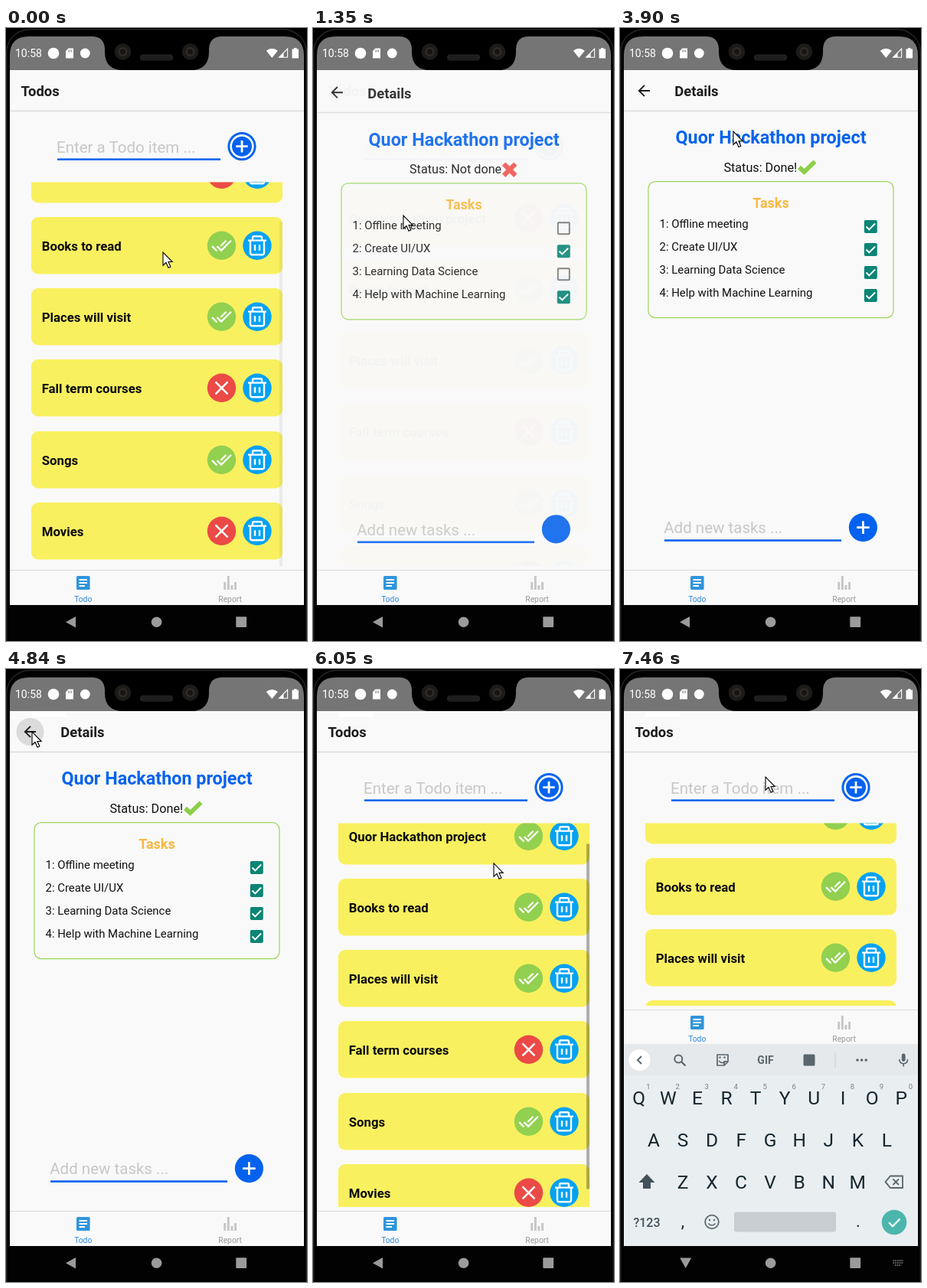
Recreate the animation shown at these times as an HTML page. Size 393 by 801 pixels, loop 8000 ms.

```html
<!DOCTYPE html>
<html lang="en">
<head>
<meta charset="utf-8">
<title>Todos</title>
<style>
html, body { margin: 0; width: 100%; height: 100%; overflow: hidden; background: #000; }
svg { display: block; width: 393px; height: 801px; font-family: Roboto, "Noto Sans", sans-serif; }
</style>
</head>
<body>
<svg id="stage" viewBox="0 0 393 801"></svg>
<script>
const LOOP = 8000, STEP = 135, EARLY = 15;
const PITCH = 93.33, KEYBOARD = 263, DRAG = 57, RISE = 52;
const BLUE = '#0462ee', BG = '#f9f9f9';
const PROJECT = 'Quor Hackathon project';
const MEMOS = [PROJECT, 'Books to read', 'Places will visit', 'Fall term courses', 'Songs', 'Movies'];
const DONE = [false, true, true, false, true, false];
const TASKS = ['Offline meeting', 'Create UI/UX', 'Learning Data Science', 'Help with Machine Learning'];

// Moments that the motion hangs on, in ms.
const T = { top: 140, press: 790, open: 1196, check: 2350, finish: 3600, back: 4840, drag: 5900, dragEnd: 6168, type: 6950 };

// The picture is refreshed in bursts of even steps and rests in between.
const BURSTS = [[0, T.top], [430, 790], [1220, 1500], [1810, 2800], [2950, 3220],
  [3600, 4560], [4840, 5770], [5900, 6890], [7040, 7460]];
const TICKS = BURSTS.flatMap(([from, to]) => {
  const n = Math.round((to - from) / STEP);
  return Array.from({ length: n + 1 }, (_, i) => from + (to - from) * i / n);
});

// Pointer moves: start, end, x, y.
const MOVES = [[0, 140, 205, 330], [430, 790, 118, 245], [1360, 1500, 368, 384], [1810, 2090, 330, 262],
  [2520, 2800, 340, 384], [2950, 3220, 331, 321], [3600, 4006, 60, 46], [4150, 4560, 34, 82],
  [4840, 5100, 83, 115], [5100, 5510, 236, 284], [T.drag, T.dragEnd, 236, 284 - DRAG], [6330, 6890, 190, 141]];

const ramp = (t, from, to) => Math.min(1, Math.max(0, (t - from) / (to - from)));
const during = (t, from, length = STEP) => t >= from && t < from + length;

function pointer(t) {
  let x = 205, y = 293;
  for (const [from, to, nx, ny] of MOVES) {
    const p = ramp(t, from, to);
    x += (nx - x) * p;
    y += (ny - y) * p;
  }
  return [x, y];
}

const scrollAt = t => t < T.top ? DRAG : Math.round(DRAG * ramp(t, T.drag, T.dragEnd));

function barAlpha(t) {
  if (t < T.top) return .06;
  return t < T.drag ? .3 * (1 - ramp(t, 430, 790)) : .3 * (1 - ramp(t, 6330, 6890));
}

// Quick rise that slows down on opening, linear fall on closing.
const detailsAt = t => t < T.back ? 1 - (1 - ramp(t, T.open, T.open + 350)) ** 5 : 1 - ramp(t, T.back, T.back + 260);

const rect = (x, y, w, h, fill, r = 0, extra = '') =>
  `<rect x="${x}" y="${y}" width="${w}" height="${h}" rx="${r}" fill="${fill}" ${extra}/>`;
const circle = (x, y, r, fill, extra = '') => `<circle cx="${x}" cy="${y}" r="${r}" fill="${fill}" ${extra}/>`;
const path = (d, fill, extra = '') => `<path d="${d}" fill="${fill}" ${extra}/>`;
const line = (d, color, w, extra = '') => path(d, 'none', `stroke="${color}" stroke-width="${w}" ${extra}`);
const text = (s, x, y, size, fill, weight = 400, anchor = 'start') =>
  `<text x="${x}" y="${y}" font-size="${size}" fill="${fill}" font-weight="${weight}" text-anchor="${anchor}">${s}</text>`;
const label = (s, x, y, size, fill, weight) => text(s, x, y, size, fill, weight, 'middle');
const at = (x, y, body) => `<g transform="translate(${x} ${y})">${body}</g>`;
const group = (id, body = '') => `<g id="${id}">${body}</g>`;
const clip = (id, body) => `<g clip-path="url(#${id})">${body}</g>`;
const plus = (r, w) => line(`M${-r} 0H${r}M0 ${-r}V${r}`, '#fff', w);
const cross = (r, color, w) => line(`M${-r} ${-r}L${r} ${r}M${r} ${-r}L${-r} ${r}`, color, w);

const doneIcon = circle(0, 0, 18.7, '#92d050') +
  path('M18 7l-1.41-1.41-6.34 6.34 1.41 1.41L18 7zm4.24-1.41L11.66 16.17 7.48 12l-1.41 1.41L11.66 19l12-12-1.42-1.41zM.41 13.41L6 19l1.41-1.41L1.83 12 .41 13.41z',
    '#fff', 'transform="scale(1.14) translate(-12 -12)"');
const openIcon = circle(0, 0, 18.7, '#eb4a46') + cross(8, '#fff', 2.5);
const binIcon = circle(0, 0, 18.7, '#03a2f2') +
  line('M-12-6.7H12M-6-7V-10.5Q-6-12-4.5-12H4.5Q6-12 6-10.5V-7M-9-6V9.5Q-9 12-6.5 12H6.5Q9 12 9 9.5V-6M-3-1V6.5M3-1V6.5',
    '#fff', 2.4, 'stroke-linejoin="round"');

const header = (title, x) => rect(5, 55, 384, 53, BG) + rect(5, 107.6, 384, 1.4, '#dcdcdc') +
  rect(5, 109, 384, 1, '#f1f1f1') + text(title, x, 89.3, 18.4, '#1c1c1e', 700);

function card(name, i) {
  return at(0, Math.round(210.5 + i * PITCH), rect(33, 0, 328, 74.5, '#f9f05f', 9) +
    group('name' + i, text(name, 46.7, 43.6, 16.8, '#0a0a0a', 700)) +
    at(281.5, 37.3, group('mark' + i, DONE[i] ? doneIcon : openIcon)) + at(328, 37.3, binIcon));
}

function listScreen() {
  return rect(5, 55, 384, 655, BG) + header('Todos', 19.6) +
    text('Enter a Todo item ...', 66, 162.6, 20.53, '#c7c7c9') + rect(67, 170.4, 213, 2.5, BLUE) +
    at(308, 154.7, circle(0, 0, 18.6, BLUE) + circle(0, 0, 14.3, BLUE, 'stroke="#fff" stroke-width="2.6"') + plus(7.7, 2.8)) +
    clip('view', group('cards', MEMOS.map(card).join('')) + rect(357, 0, 4, 451, '#000', 0, 'id="bar"'));
}

function checkbox(i) {
  return at(327.3, 259.5 + i * 30,
    circle(0, 0, 18, '#0b8574', `id="ripple${i}" opacity="0"`) +
    group('off' + i, rect(-7.5, -7.5, 15, 15, 'none', 1, 'stroke="#757575" stroke-width="1.9"')) +
    group('on' + i, rect(-8.5, -8.5, 17, 17, '#0b8574', 2) + line('M-5.8 0L-2 3.8L5.8-4', '#fff', 1.9)));
}

function detailScreen() {
  const status = group('open', text('Status: Not done', 126, 188, 16.2, '#111') + at(256.7, 183, cross(7.6, '#ef5350', 6.2))) +
    group('done', text('Status: Done!', 135.4, 188, 16.2, '#111') + line('M234 182L240.5 188L254.5 174.5', '#8bcf46', 5.8));
  const row = (s, i) => text(`${i + 1}: ${s}`, 51.5, 261 + i * 30, 14.93, '#111') + checkbox(i);
  return rect(5, 55, 384, 655, BG) + header('Details', 71.3) +
    circle(31.5, 82, 18, '#000', 'id="backRipple" opacity="0"') +
    line('M39 82H25M32 74.8L24.8 82L32 89.2', '#1c1c1e', 1.9) +
    label(PROJECT, 197, 151.4, 23.33, BLUE, 700) + status +
    rect(37, 200.6, 320, 178, 'none', 9, 'stroke="#9bd65a" stroke-width="1.2"') +
    label('Tasks', 197, 234.5, 18, '#f9b840', 700) + TASKS.map(row).join('') +
    text('Add new tasks ...', 57.2, 660.3, 20.53, '#c7c7c9') + rect(58, 668.3, 231, 2.6, BLUE) +
    at(317.4, 652.6, circle(0, 0, 18.6, BLUE) + group('plus', plus(8.3, 2.7)));
}

function tabs() {
  const bar = i => rect(284.3 + i * 4.6, 724 - (i === 1) * 8 + (i === 2) * 4, 2.9, 10 + (i === 1) * 8 - (i === 2) * 4, '#c6c6c6');
  return rect(5, 703, 384, 51, BG) + rect(5, 708, 384, 1, '#dadada') +
    rect(92, 716, 17.6, 18, '#2f95dc', 1.5) + line('M95.5 721H106M95.5 725H106M95.5 729H103', '#fff', 1.9) +
    label('Todo', 100.7, 750, 10.27, '#2e86e0') +
    [0, 1, 2, 3].map(bar).join('') + label('Report', 292.6, 750, 10.27, '#98989c');
}

function keyboard() {
  const ink = '#5a666d', dark = '#14262e', step = 38.05;
  const keys = (s, x, y, size, fill) => [...s].map((k, i) => label(k, x + i * step, y, size, fill)).join('');
  const face = (x, y) => circle(x - 3, y - 2.5, 1.2, ink) + circle(x + 3, y - 2.5, 1.2, ink) +
    line(`M${x - 4.5} ${y + 2}Q${x} ${y + 7} ${x + 4.5} ${y + 2}`, ink, 1.7);
  const toolbar = rect(5, 490, 384, 41, '#e5e9ec') + circle(25.5, 511, 14, '#fff') + line('M28 506L23 511L28 516', ink, 2) +
    circle(76.3, 509.5, 5, 'none', `stroke="${ink}" stroke-width="2"`) + line('M80 513L85.5 518.5', ink, 2.3) +
    line('M127 504H141V513L136 518H127ZM136 518V513H141', ink, 1.7, 'stroke-linejoin="round"') + face(133.5, 510) +
    label('GIF', 190, 515.5, 14, ink, 700) + rect(239.5, 503.5, 15, 15, ink, 1.5) + rect(280.5, 501, 1, 20, '#cbd0d3') +
    [-1, 0, 1].map(i => circle(315.6 + i * 5.6, 511, 1.8, ink)).join('') +
    rect(367.8, 502.5, 4.8, 10.5, ink, 2.4) + line('M364.8 510Q365 515.7 370.2 515.7Q375.4 515.7 375.6 510M370.2 515.7V519.5', ink, 1.6);
  return rect(5, 490, 384, 264, '#e9eef1') + toolbar +
    keys('QWERTYUIOP', 24.8, 569, 24.5, dark) + keys('ASDFGHJKL', 44, 624, 24.5, dark) +
    keys('ZXCVBNM', 82, 679, 24.5, dark) + keys('1234567890', 37, 549, 9.5, '#74828a') +
    path('M35 660L45.5 671H40V679H30V671H24.5Z', '#43515a') +
    line('M353 662.5H369V678H353L346.5 670.2Z', ink, 1.8) + at(360.2, 670.2, cross(3.8, ink, 1.8)) +
    label('?123', 35, 729, 16, '#43515a', 500) + label(',', 82, 729, 22, dark) +
    circle(120, 722.5, 8.8, 'none', `stroke="${ink}" stroke-width="1.8"`) + face(120, 722.5) +
    rect(149, 709.5, 133, 26, '#c8cdd1', 3) + label('.', 311, 729, 22, dark) +
    circle(358, 723, 16.3, '#4db6ac') + line('M351 723.3L356 728.2L365.5 718.5', '#fff', 2.3);
}

function navBar() {
  const grey = '#9b9b9b';
  return rect(5, 754, 384, 47, '#020202') + circle(196.6, 776.3, 6.8, grey) + rect(300.3, 769.3, 13.8, 13.8, grey, 1) +
    group('navBack', path('M78 776.3L91 769V783.6Z', grey)) +
    group('navDown', path('M78.2 769.5H93.2L85.7 783Z', grey) +
      line('M356.5 773H370M356.5 776H370M359 779H367.5', '#858585', 1.6, 'stroke-dasharray="1.7 1"'));
}

function statusBar() {
  return path('M5 55V36Q5 11 30 11H112Q128 11 129 27V31Q129 55 153 55H241Q265 55 265 31V27Q266 11 282 11H364Q389 11 389 36V55Z', '#757575') +
    text('10:58', 12, 38.2, 14, '#fff') + circle(62, 33, 7.3, '#fff') +
    path('M81.5 26.5H88V39.5H78V30Z', '#fff') + line('M82.2 28.5V31.5M85 28.5V31.5', '#757575', 1.2) +
    circle(103.3, 33, 6.4, '#fff') +
    path('M339.8 29.7Q347.3 24 354.8 29.7L347.3 39Z', '#fff') +
    line('M367.6 27V38.3H356.6Z', '#fff', 1.1) + path('M362.5 32.5V38.5H356.5Z', '#fff') +
    path('M376 26H379.5V27.5H382V39.5H373.5V27.5H376Z', '#fff');
}

function shell() {
  const lens = x => circle(x, 31, 10.7, '#1d1b18') + circle(x, 31, 6, '#2f2c27') + circle(x, 31, 3.4, '#171512');
  return rect(.8, 1.8, 391.4, 840, 'none', 30, 'stroke="#2c2c2c" stroke-width="1.2"') +
    lens(152.5) + lens(240.5) + rect(175, 34.5, 43, 8, '#222', 4) +
    line('M178 37H215M178 40H215', '#0a0a0a', 1.2, 'stroke-dasharray="1.3 1.3"');
}

const stage = document.getElementById('stage');
stage.innerHTML = `<defs>
  <clipPath id="view"><rect id="viewRect" x="5" y="201.5" width="384" height="502"/></clipPath>
  <clipPath id="app"><rect x="5" y="55" width="384" height="653"/></clipPath>
  <clipPath id="screen"><rect x="5" y="0" width="384" height="754"/></clipPath></defs>` +
  rect(0, 0, 393, 801, '#000') + rect(5, 55, 384, 699, BG) +
  group('list', listScreen()) + clip('app', group('detail', detailScreen())) +
  rect(34, 55.5, 44, 7, '#fff', 0, 'id="patch"') + group('tabs', tabs()) +
  clip('screen', group('keys', keyboard())) + navBar() + statusBar() + shell() +
  group('cursor', path('M0 0V17.2L4 13.5L7 20.3L9.9 19L7 12.5H12.2Z', '#fff', 'stroke="#000" stroke-width="1.1"'));

const $ = id => document.getElementById(id);
const show = (id, on) => $(id).setAttribute('display', on ? 'inline' : 'none');
const fade = (id, v) => $(id).setAttribute('opacity', v);
const move = (id, x, y) => $(id).setAttribute('transform', `translate(${x} ${y})`);

function render(t) {
  const scroll = scrollAt(t), detail = detailsAt(t);
  const typing = ramp(t, T.type, T.type + 350), raised = typing === 1;
  const finished = t >= T.finish;

  move('cursor', ...pointer(t));
  move('cards', 0, -scroll);
  $('bar').setAttribute('y', 201.5 + scroll * .9);
  fade('bar', barAlpha(t));
  fade('name0', t < T.press ? 1 : .25 + .75 * ramp(t, 1000, 1350));
  $('mark0').innerHTML = finished ? doneIcon : openIcon;
  fade('list', detail > .8 ? .2 : 1);

  show('detail', detail > 0);
  fade('detail', detail ** 3);
  move('detail', 0, RISE * (1 - detail));
  show('plus', detail === 1);
  show('open', !finished);
  show('done', finished);
  [t >= T.check, true, finished, true].forEach((on, i) => {
    show('on' + i, on);
    show('off' + i, !on);
  });
  fade('ripple0', during(t, T.check - STEP, 2 * STEP) ? .16 : 0);
  fade('ripple2', during(t, T.finish) ? .16 : 0);
  fade('backRipple', during(t, T.back, STEP - 5) ? .12 : 0);
  show('patch', t >= 4270);

  $('viewRect').setAttribute('height', raised ? 502 - KEYBOARD : 502);
  move('tabs', 0, raised ? -KEYBOARD : 0);
  show('keys', typing > 0);
  move('keys', 0, (1 - typing) * KEYBOARD);
  show('navBack', typing === 0);
  show('navDown', typing > 0);
}

const start = performance.now();
let shown = -1;
function frame() {
  const t = (performance.now() - start) % LOOP;
  const tick = TICKS.filter(k => k <= t + EARLY).pop();
  if (tick !== shown) render(shown = tick);
  requestAnimationFrame(frame);
}
frame();
</script>
</body>
</html>
```
